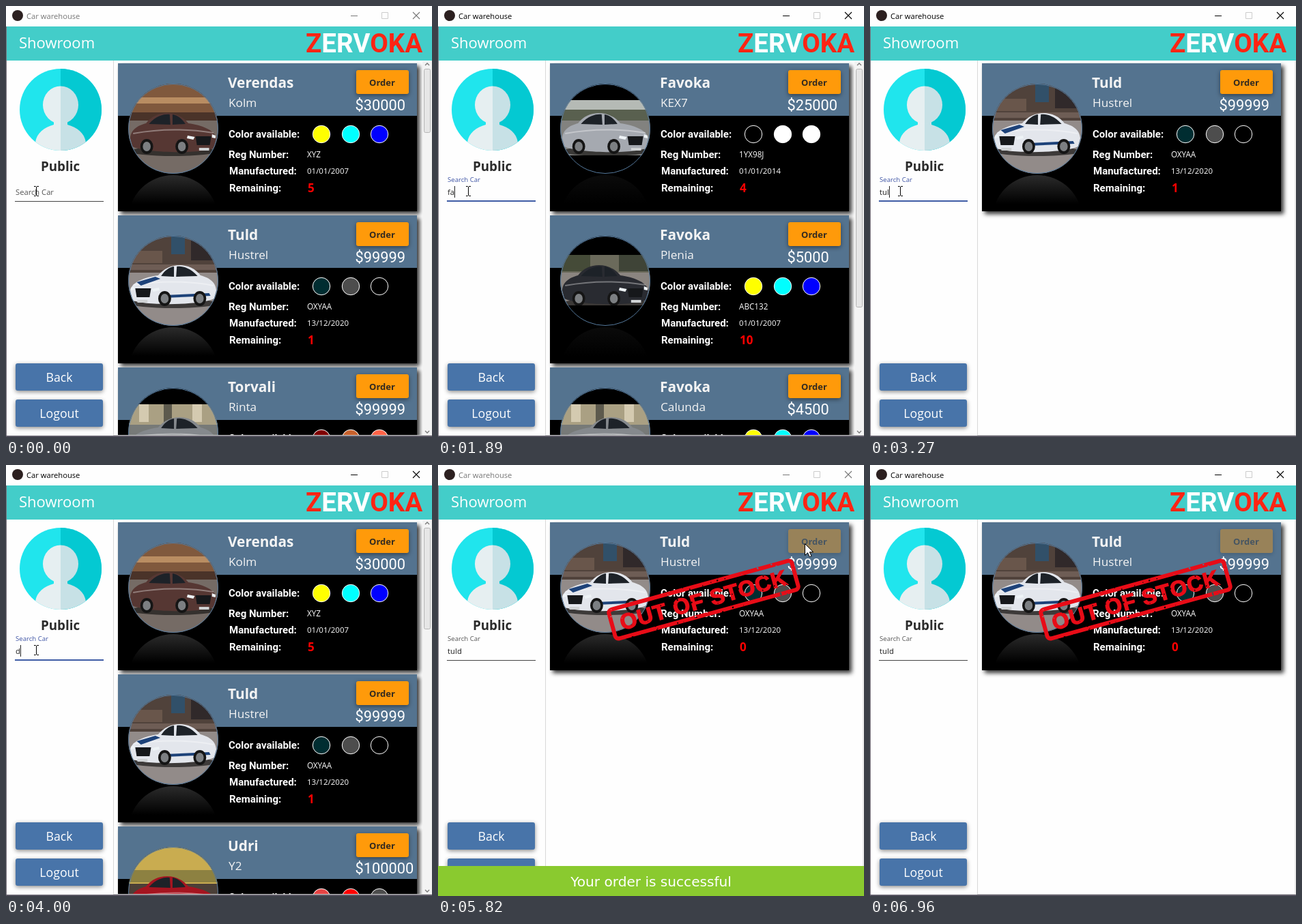
An HTML page for the animation above (7000 ms loop, 624x632 px).

```html
<!DOCTYPE html>
<html lang="en">
<head>
<meta charset="utf-8">
<title>Car warehouse</title>
<style>
  html, body { margin: 0; width: 100%; height: 100%; overflow: hidden; background: #fefefe; }
  svg { display: block; font-family: "Open Sans", "Noto Sans", sans-serif; }
  text { white-space: pre; }
  .r { font-family: Roboto, sans-serif; }
  .b { font-weight: 700; }
  .m { text-anchor: middle; }
  .lift { filter: drop-shadow(0 2px 3px rgba(0, 0, 0, .45)); }
  .card { filter: drop-shadow(4px 4px 3px rgba(0, 0, 0, .8)); }
</style>
</head>
<body>
<svg id="stage" width="624" height="632" viewBox="0 0 624 632"></svg>
<script>
const LOOP = 7000;
const $ = id => document.getElementById(id);
const rect = (x, y, w, h, fill, more = '') =>
  `<rect x="${x}" y="${y}" width="${w}" height="${h}" fill="${fill}" ${more}/>`;
const disc = (x, y, r, fill, more = '') =>
  `<circle cx="${x}" cy="${y}" r="${r}" fill="${fill}" ${more}/>`;
const path = (d, fill, more = '') => `<path d="${d}" fill="${fill}" ${more}/>`;
const text = (x, y, s, size, fill = '#fff', cls = '', more = '') =>
  `<text x="${x}" y="${y}" font-size="${size}" fill="${fill}" class="${cls}" ${more}>${s}</text>`;

// Photo looks: wall, ground, body colour, facing (1 right, -1 left), visible band, extra shapes
const photos = {
  maroon: { wall: '#80593d', ground: '#756b65', body: '#563733', face: 1, band: [-66, 66],
    extra: rect(-66, -46, 132, 9, '#b98d62') + rect(-66, -24, 132, 12, '#4a3329') },
  striped: { wall: '#50423b', ground: '#928b89', body: '#e3e6ec', face: -1, band: [-66, 66],
    extra: rect(-66, -44, 50, 18, '#69564b') + rect(-3, -66, 20, 27, '#315069')
      + rect(26, -60, 40, 30, '#30292a') + rect(-66, -24, 132, 8, '#6e5d55'), stripe: '#1d4279' },
  street: { wall: '#aaa083', ground: '#777a78', body: '#85898d', face: -1, band: [-42, 42],
    extra: rect(-50, -42, 14, 26, '#d4cab0') + rect(-14, -42, 12, 26, '#5d5a4d') + rect(28, -42, 14, 26, '#d4cab0') },
  silver: { wall: '#59604f', ground: '#82827f', body: '#a5a9b0', face: 1, band: [-42, 39],
    extra: rect(-66, -42, 132, 14, '#b5bab5') },
  black: { wall: '#6b6a5b', ground: '#8b8580', body: '#292b31', face: 1, band: [-38, 36],
    extra: rect(-66, -38, 44, 24, '#454b38') + rect(20, -38, 46, 24, '#3f4437') },
  dusk: { wall: '#c9ac50', ground: '#4b4038', body: '#a51520', face: 1, band: [-66, 66],
    extra: rect(-66, -32, 132, 18, '#8d8141') }
};

const primary = ['#ff0', '#0ff', '#00f'];
const cars = {
  verendas: ['Verendas', 'Kolm', 30000, primary, 'XYZ', '01/01/2007', 5, 'maroon'],
  tuld: ['Tuld', 'Hustrel', 99999, ['#002d31', '#4d4d4d', '#000'], 'OXYAA', '13/12/2020', 1, 'striped'],
  torvali: ['Torvali', 'Rinta', 99999, ['#800000', '#c8622d', '#ff6347'], '', '', '', 'street'],
  kex: ['Favoka', 'KEX7', 25000, ['#000', '#fff', '#fff'], '1YX98J', '01/01/2014', 4, 'silver'],
  plenia: ['Favoka', 'Plenia', 5000, primary, 'ABC132', '01/01/2007', 10, 'black'],
  calunda: ['Favoka', 'Calunda', 4500, primary, '', '', '', 'street'],
  udri: ['Udri', 'Y2', 100000, ['#e64545', '#f00', '#4d4d4d'], '', '', '', 'dusk']
};

// Cards and the lower end of the scroll thumb (0: no scroll bar)
const lists = {
  all: [['verendas', 'tuld', 'torvali'], 185],
  fav: [['kex', 'plenia', 'calunda'], 441],
  pair: [['tuld', 'torvali'], 0],
  one: [['tuld'], 0],
  d: [['verendas', 'tuld', 'udri'], 240],
  sold: [['tuld'], 0]
};

const steps = [
  [0, '', 'all'], [720, 'f', 'all'], [770, 'f', 'fav'], [820, 'fa', 'fav'], [1000, 'fav', 'fav'],
  [1100, 'favo', 'fav'], [1240, 'favok', 'fav'], [1310, 'favoka', 'fav'], [1550, 'favok', 'fav'],
  [1650, 'favo', 'fav'], [1770, 'fav', 'fav'], [1890, 'fa', 'fav'], [2030, 'f', 'fav'],
  [2120, '', 'fav'], [2200, '', 'all'], [2480, 't', 'all'], [2560, 'tu', 'one'], [2650, 'tul', 'one'],
  [2860, 'tuld', 'one'], [3240, 'tul', 'one'], [3340, 'tu', 'one'], [3650, 't', 'pair'],
  [3720, '', 'all'], [4000, 'd', 'd'], [4270, '', 'all'], [4510, 't', 'pair'], [4590, 'tu', 'one'],
  [4670, 'tul', 'one'], [4750, 'tuld', 'one'], [5620, 'tuld', 'sold']
];

const pointer = [
  [4960, 44, 271], [5240, 464, 66], [5440, 530, 100], [5680, 535, 107], [5820, 537, 115],
  [6400, 537, 115], [6850, 566, 640]
];

function car(body, face, stripe) {
  return `<g transform="translate(0 4) scale(${face * 1.05} 1)">`
    + `<ellipse cy="29" rx="60" ry="7" fill="#1b1918" opacity=".7"/>`
    + path('M-60 10C-59-4-48-9-38-12C-24-32 6-32 21-12C40-9 56-3 60 9L58 24C40 33-38 32-57 22Z', body)
    + path('M-34-11C-22-26-8-26-5-25L-4-10Z M-1-10V-25C6-24 12-19 17-11Z', '#1d2228')
    + path('M-56 3C-20-4 20-4 56 2', 'none', 'stroke="#fff" stroke-opacity=".35" stroke-width="2"')
    + (stripe ? path('M25-10L51-2L45 3L18-7Z M-50 14L12 17V21L-52 18Z', stripe) : '')
    + path('M31 7H53L51 20H33Z', '#16181b') + rect(36, 24, 14, 4, '#cfd2d4')
    + path('M20 6L30 8L28 12L19 10Z M54 4L59 6V10L54 9Z', '#eef3f6')
    + [-37, 12].map(x => `<ellipse cx="${x}" cy="22" rx="9" ry="11" fill="#151515"/>`
      + `<ellipse cx="${x}" cy="22" rx="5.5" ry="7" fill="#7c7f82"/>`).join('') + '</g>';
}

function photo(name) {
  const p = photos[name], [top, end] = p.band, boxed = top > -66;
  return `<g clip-path="url(#slot)">${disc(81, 230, 66, 'url(#fade)', boxed ? 'opacity=".25"' : '')}</g>`
    + `<g transform="translate(81 96)"><g clip-path="url(#round)">` + rect(-66, -66, 132, 132, '#000')
    + rect(-66, top, 132, end - top, p.ground) + rect(-66, top, 132, -12 - top, p.wall)
    + p.extra + car(p.body, p.face, p.stripe)
    + (boxed ? rect(-66, end, 132, 66 - end, '#000') : '') + '</g>'
    + disc(0, 0, 65.5, 'none', 'stroke="#55799c"') + '</g>';
}

function card(id, i, sold) {
  const [make, model, price, colours, reg, made, left, look] = cars[id];
  const label = (x, y, s) => text(x, y, s, 15, '#fff', 'r b');
  return `<g transform="translate(164 ${84 + 223 * i})"><g class="card">`
    + rect(0, 0, 438, 217, '#000') + rect(0, 0, 438, 77, '#54738f') + '</g>' + photo(look)
    + text(161, 36, make, 20.8, '#f4f4f4', 'b') + text(162, 64, model, 17.2, '#f4f4f4')
    + `<g opacity="${sold ? .4 : 1}">` + rect(349, 10, 77, 35, '#ff9a0a', 'rx="3" class="lift"')
    + text(387, 33, 'Order', 13, '#332a20', 'b m') + '</g>'
    + text(347.5, 69, '$' + price, 21.8, '#fff', 'r')
    + label(162, 109, 'Color available:')
    + colours.map((c, k) => disc([298, 341, 383][k], 104, 12.7, c, 'stroke="#fff"')).join('')
    + label(162, 139, 'Reg Number:') + label(163, 163, 'Manufactured:') + label(163, 188, 'Remaining:')
    + text(277, 138, reg, 11.7) + text(277, 162, made, 11.5)
    + text(278, 189, sold ? 0 : left, 17, '#f00', 'b') + '</g>';
}

function scrollBar(end) {
  return rect(610, 81, 13, 548, '#f3f3f3') + rect(612.5, 92.5, 9, end - 92, '#e6e6e6', 'rx="2" stroke="#b5b5b5"')
    + path('M614 87L617 84L620 87M614 623L617 626L620 623', 'none', 'stroke="#777" stroke-width="1.3"');
}

function stamp() {
  let seed = 7, specks = '';
  const rnd = () => (seed = seed * 16807 % 2147483647) / 2147483647;
  for (let i = 0; i < 130; i++)
    specks += disc(rnd() * 290 - 145, rnd() * 60 - 30, .4 + rnd() * .9, '#000');
  return `<mask id="worn" maskUnits="userSpaceOnUse" x="-150" y="-40" width="300" height="80">`
    + rect(-150, -40, 300, 80, '#fff') + specks + '</mask>'
    + `<g transform="translate(389 197.5) rotate(-15.4)"><g mask="url(#worn)">`
    + rect(-139, -22, 278, 44, 'none', 'rx="5" stroke="#e80c17" stroke-width="6"')
    + text(0, 11.5, 'OUT OF STOCK', 32, '#e80c17', 'b m',
      'stroke="#e80c17" stroke-width="1.4" font-family="Liberation Sans, sans-serif" letter-spacing="1"') + '</g></g>';
}

function listMarkup(key) {
  const [ids, end] = lists[key];
  return ids.map((id, i) => card(id, i, key === 'sold')).join('')
    + (end ? scrollBar(end) : '') + (key === 'sold' ? stamp() : '');
}

const sideButton = (y, s) => rect(14, y, 128, 40, '#4874a9', 'rx="3" class="lift"')
  + text(78, y + 27, s, 17.7, '#fff', 'm');

const torso = 'M43 215V200C45 186 56 178 70 174V160H90V174C104 178 115 186 117 200V215Z';
const person = (a, b) => disc(80, 152, 60, a) + `<g clip-path="url(#bust)">`
  + path(torso, b) + '</g>' + `<ellipse cx="80" cy="145" rx="26" ry="27.5" fill="${b}"/>`;

$('stage').innerHTML = `<defs>
  <clipPath id="round"><circle r="66"/></clipPath>
  <clipPath id="slot"><rect width="438" height="217"/></clipPath>
  <clipPath id="bust"><circle cx="80" cy="152" r="60"/></clipPath>
  <clipPath id="half"><rect x="80" y="90" width="62" height="124"/></clipPath>
  <clipPath id="view"><rect x="158" y="80" width="466" height="549"/></clipPath>
  <linearGradient id="fade" x2="0" y2="1"><stop stop-color="#2b2b2b"/><stop offset=".32" stop-color="#000"/></linearGradient>
</defs>`
  + rect(0, 0, 624, 632, '#fefefe') + rect(157, 80, 1, 550, '#d8d8d8')
  + rect(622.5, 80, 1, 550, '#d0d0d0') + rect(157, 629, 467, 1, '#ccc')
  + `<g id="list" clip-path="url(#view)"></g>`
  + disc(17, 14, 8, '#2c2020') + text(30, 19, 'Car warehouse', 11.2, '#000', '', 'id="title"')
  + path('M550.5 9.5H559.5V18.5H550.5Z', 'none', 'stroke="#ccc"')
  + path('M505 14.5H515M596 9L606 19M606 9L596 19', 'none', 'id="controls" stroke-width="1.1"')
  + rect(0, 30, 624, 50, '#43cdc9') + text(19, 62, 'Showroom', 22)
  + text(439, 68, '<tspan>Z</tspan><tspan fill="#fff">ERV</tspan>OKA', 38.5, '#ff2413', 'r b')
  + person('#20e5ed', '#e6eff1') + `<g clip-path="url(#half)">${person('#04c9d2', '#c7e1e6')}</g>`
  + text(79.5, 242, 'Public', 18.8, '#2c2c2c', 'b m')
  + text(14, 277, 'Search Car', 11.2, '#555', '', 'id="label"')
  + text(14, 277, '', 11.4, '#222', '', 'id="query"')
  + rect(14, 264, 1, 17, '#222', 'id="caret"') + rect(13, 286, 130, 1, '#444', 'id="line"')
  + sideButton(524, 'Back') + sideButton(577, 'Logout')
  + rect(0, 30, 1, 602, '#77717b') + rect(0, 630, 624, 2, '#5d5a66')
  + `<g id="snack">${rect(0, 588, 624, 44, '#8aca2f')}`
  + text(312, 618, 'Your order is successful', 20.1, '#fff', 'm', 'font-family="DejaVu Sans, sans-serif"') + '</g>'
  + path('M41 264.5H43.5L44.5 265.5L45.5 264.5H48M44.5 265V278M41 278.5H43.5L44.5 277.5L45.5 278.5H48', 'none',
    'id="beam" stroke="#000"')
  + path('M0 0V17L4 13.2L6.8 19.3L9.6 18L6.9 12.2H12.2Z', '#fff', 'id="arrow" stroke="#000"');

const clamp = v => Math.max(0, Math.min(1, v));
const ease = v => v * v * (3 - 2 * v);
const ramp = (t, a, b) => ease(clamp((t - a) / (b - a)));
const set = (id, props) => { for (const k in props) $(id).setAttribute(k, props[k]); };
const show = (id, on) => set(id, { visibility: on ? 'visible' : 'hidden' });

function along(points, t) {
  let i = 0;
  while (i < points.length - 2 && t >= points[i + 1][0]) i++;
  const [a, x, y] = points[i], [b, u, v] = points[i + 1], k = ramp(t, a, b);
  return [x + (u - x) * k, y + (v - y) * k];
}

let shown;
function render(t) {
  const [, query, key] = steps.findLast(s => s[0] <= t);
  if (key !== shown) $('list').innerHTML = listMarkup(shown = key);

  const active = t >= 170 && t < 5620 || t >= 6480;
  set('title', { fill: active ? '#000' : '#777' });
  set('controls', { stroke: active ? '#000' : '#777' });

  const focus = t >= 170 && t < 5620, lift = ramp(t, 150, 270);
  set('label', { y: 277 - 19 * lift, 'font-size': 11.2 - 1.6 * lift, fill: focus ? '#3f55a5' : '#555' });
  set('line', focus ? { y: 285, height: 2, fill: '#3f5ca5' } : { y: 286, height: 1, fill: '#444' });
  $('query').textContent = query;
  set('caret', { x: Math.round(14 + (query ? $('query').getComputedTextLength() : 0)) });
  show('caret', focus && !(t >= 480 && t < 720) && !(t >= 3060 && t < 3240) && t < 5000);

  const up = ramp(t, 5670, 5800) - ramp(t, 6240, 6380);
  set('snack', { transform: `translate(0 ${44 * (1 - up)})` });
  show('snack', up > 0);

  const [x, y] = along(pointer, t);
  show('beam', t < 4960);
  show('arrow', t >= 4960 && t < 6850);
  set('arrow', { transform: `translate(${x + .5} ${y + .5})` });
}

function tick() {
  render(performance.now() % LOOP);
  requestAnimationFrame(tick);
}
tick();
</script>
</body>
</html>
```
